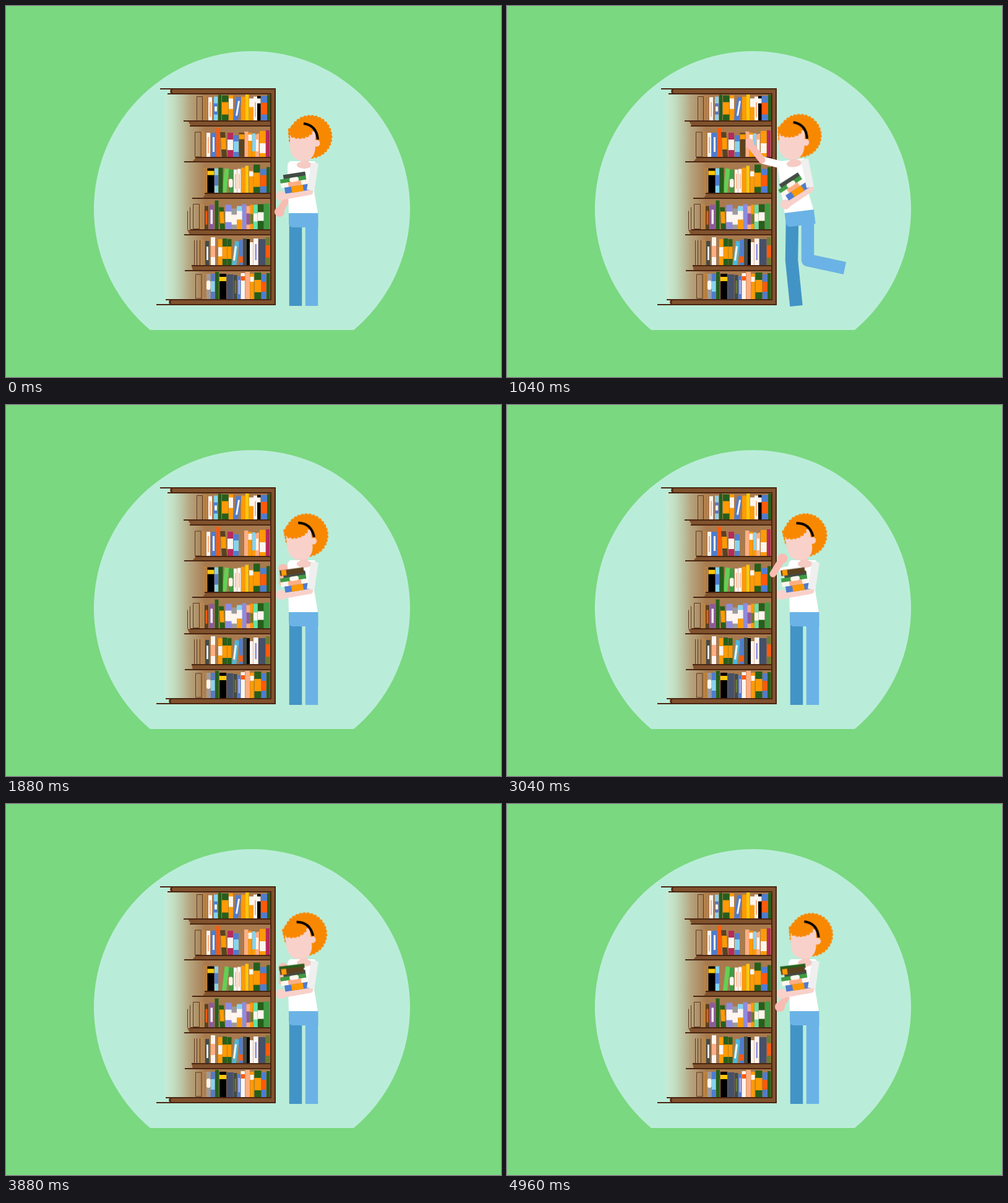
An HTML page without scripts that plays this animation: 800x600 px, repeating every 5 s.

```html
<!DOCTYPE html>
<html lang="en">
<head>
<meta charset="utf-8">
<title>Choosing books</title>
<style>
html, body { margin: 0; width: 100%; height: 100%; overflow: hidden; background: #7ad880; }
svg { display: block; width: 100%; height: 100%; }

/* book colours */
.g { fill: #265f1b; } .o { fill: #ff9a05; } .w { fill: #fdf5ee; } .b { fill: #4f7ccf; }
.s { fill: #87d3ee; } .r { fill: #ff5a0a; } .y { fill: #fdc60d; } .k { fill: #000; }
.p { fill: #ffae83; } .c { fill: #b62a5b; } .n { fill: #5a4220; } .l { fill: #63cf55; }
.e { fill: #3f9a43; } .v { fill: #8d8be0; } .u { fill: #8d5a98; } .t { fill: #465069; }
.d { fill: #434b45; } .m { fill: #68e0a5; } .a { fill: #9d9a9c; } .z { fill: #6b7a34; }
.ghost { fill: none; stroke: #5d3a20; }
.amber { fill: none; stroke: #d08a35; }

.board { fill: #80522d; }
.edge { fill: none; stroke: #4a2512; stroke-width: 2; }

.limb { fill: none; stroke-linejoin: round; }
.leg { stroke-width: 20.5; }
.skin { fill: #f8d1ca; }
.curl { fill: #f88800; stroke: #f88800; stroke-width: 6; stroke-linecap: round; stroke-dasharray: 0 6; }

.move { animation: 5s ease-in-out infinite; }
#torso { transform-origin: 481px 335px; animation-name: torso; }
#head { transform-origin: 482px 256px; animation-name: head; }
#hold { transform-origin: 492px 300px; animation-name: hold; }
#sleeve { animation-name: sleeve; }
#backLeg { animation-name: backLeg; }
#frontLeg { animation-name: frontLeg; }
#upper { animation-name: upper; }
#fore { animation-name: fore; }
#brown { animation-name: brown; }
#green { animation-name: green; }

@keyframes torso {
  0%, 33.6%, 100% { transform: none; }
  10.4% { transform: translate(0, 10px) rotate(-8.5deg); }
  18% { transform: translate(-9px, -3px) rotate(-7.5deg); }
  20.8% { transform: translate(-8.5px, -3px) rotate(-7deg); }
}
@keyframes head {
  0%, 100% { transform: none; }
  10.4% { transform: translate(-13px, 11px) rotate(-15deg); }
  18% { transform: translate(-21px, -2px) rotate(1deg); }
  20.8% { transform: translate(-20px, -2px) rotate(1.5deg); }
  33.6% { transform: rotate(-1deg); }
  37.6% { transform: translate(-1.3px, 0) rotate(-6.5deg); }
  45%, 60.4% { transform: translate(-2px, 0) rotate(-10deg); }
  67.6% { transform: translate(-1.2px, 0) rotate(-6deg); }
  77.6%, 90.4% { transform: translate(-1.6px, 0) rotate(-8.5deg); }
  99.2% { transform: rotate(-.5deg); }
}
@keyframes hold {
  0%, 33.6%, 100% { transform: none; }
  10.4% { transform: translate(-18px, 7px) rotate(2.5deg); }
  18% { transform: translate(-2px, -5px) rotate(-24deg); }
  20.8% { transform: translate(-1px, -5px) rotate(-24deg); }
}
@keyframes sleeve {
  0%, 33.6%, 100% { d: path("M499 254L492 298"); }
  10.4% { d: path("M486 261L475 305"); }
  18%, 20.8% { d: path("M481 248L490 293"); }
}
@keyframes backLeg {
  0%, 33.6%, 100% { d: path("M468 345L468 420L468 485"); }
  10.4% { d: path("M469 358L457 423L467 485.5"); }
  18%, 20.8% { d: path("M461 345L460 411L467.5 485"); }
}
@keyframes frontLeg {
  0%, 33.6%, 100% { d: path("M494 345L494 420L494 485"); }
  10.4% { d: path("M492 352L480 422L494 485"); animation-timing-function: ease-in; }
  14% { d: path("M489 346L483 417L528 462"); animation-timing-function: ease-out; }
  18.6% { d: path("M486 340L486 411L548 421"); }
  20.8% { d: path("M486 340L486 411L546 424"); animation-timing-function: ease-in; }
  27% { d: path("M490 342L489 416L527 466"); animation-timing-function: ease-out; }
}
@keyframes upper {
  0%, 100% { d: path("M464 264L464 300"); }
  10.4% { d: path("M452 272L456 308"); }
  18% { d: path("M455 260L406 246"); }
  20.8% { d: path("M455 260L412 249"); }
  28.8% { d: path("M460 264L434 283"); }
  33.6%, 37.6% { d: path("M464 264L452 286"); }
  47.2%, 60.4% { d: path("M464 264L441 270"); }
  67.6% { d: path("M462 264L408 280"); }
  72% { d: path("M463 264L424 296"); }
  77.6%, 90.4% { d: path("M464 264L452 286"); }
  99.2% { d: path("M464 264L464 300"); }
}
@keyframes fore {
  0%, 100% { d: path("M460 300L442 333"); }
  10.4% { d: path("M451 308L441 349"); }
  14% { d: path("M424 276L402 262"); }
  18% { d: path("M406 246L369 218"); }
  20.8% { d: path("M412 249L391 222"); }
  23.2% { d: path("M415 252L393 228"); }
  28.8% { d: path("M434 283L419 258"); }
  33.6% { d: path("M443 288L441 263"); }
  37.6% { d: path("M446 287L448 265"); }
  47.2%, 60.4% { d: path("M430 273L446 248"); }
  67.6% { d: path("M408 280L351 282"); }
  72% { d: path("M424 296L388 314"); }
  75% { d: path("M438 300L424 292"); }
  77.6%, 90.4% { d: path("M446 287L448 265"); }
  99.2% { d: path("M460 300L441 328"); }
}
@keyframes brown {
  0%, 22.8% { transform: translate(381px, 224.5px); }
  28.8% { transform: translate(424px, 255px) rotate(-45deg); }
  33.6% { transform: translate(452px, 262px) rotate(-88deg); }
  37.6%, 100% { transform: translate(462px, 269.5px) rotate(-98deg); }
}
@keyframes green {
  0%, 67.8% { transform: translate(347px, 282px); }
  72% { transform: translate(387px, 334px) rotate(-12deg); }
  75% { transform: translate(428px, 298px) rotate(-60deg); }
  77.6%, 100% { transform: translate(462px, 264px) rotate(-97deg); }
}
</style>
</head>
<body>
<svg viewBox="0 0 800 600" preserveAspectRatio="none">
  <defs>
    <linearGradient id="fade" gradientUnits="userSpaceOnUse" x1="257" y1="0" x2="322" y2="0">
      <stop offset="0" stop-color="#d8e8cc" stop-opacity=".45"/>
      <stop offset=".2" stop-color="#c8d6b6" stop-opacity=".6"/>
      <stop offset=".6" stop-color="#b59a72" stop-opacity=".85"/>
      <stop offset="1" stop-color="#a87a4e"/>
    </linearGradient>
    <marker id="palm" markerUnits="userSpaceOnUse" markerWidth="18" markerHeight="18" refX="9" refY="9">
      <circle cx="9" cy="9" r="8" fill="#f8bcb2"/>
    </marker>
  </defs>

  <rect width="800" height="600" fill="#7ad880"/>
  <path fill="#baedd9" d="M233 524A255.5 255.5 0 1 1 562 524z"/>

  <!-- bookcase -->
  <path fill="url(#fade)" d="M257 142H428V475H257z"/>

  <g transform="translate(0 185.5)">
    <path class="ghost" d="M308.5 0v-39h9v39z"/><path class="amber" d="M320 0v-39h4v39z"/>
    <path class="w" d="M327 0v-38h6v38M360 0v-40h7v40M393 0v-36h7v36M400 0v-39h6v39"/>
    <path class="p" d="M329-6v-24h2v24M402-6v-24h2v24"/>
    <path class="s" d="M336 0v-39h6v39"/><path class="b" d="M336-10v-18h6v18M412 0v-40h10v40M367 0l5-38h8l-5 38"/>
    <path class="w" d="M337-15v-8h4v8M371-8l4-24h3l-4 24"/>
    <path class="g" d="M343 0v-42h5v42M349 0v-41h10.500v41M422 0v-42h5v42"/>
    <path class="o" d="M349-10v-20h10.500v20M360 0v-19h7v19M360-36v-5h7v5M380 0v-39h7v39M393 0v-22h7v22"/>
    <path class="y" d="M387 0v-43h5.500v43"/>
    <path class="k" d="M406 0v-40h5.500v40"/><path class="w" d="M406-28v-8h5.500v8"/>
    <path class="r" d="M412-10v-19h10v19"/>
  </g>

  <g transform="translate(0 244)">
    <path class="ghost" d="M305.500 0v-40h9.500v40z"/><path class="amber" d="M318 0v-39h3v39z"/>
    <path class="w" d="M324 0v-39h6v39"/><path class="p" d="M326-6v-26h2v26"/>
    <path class="b" d="M331 0v-39h8.500v39M368 0v-35h8v35"/><path class="w" d="M334-8v-24h3v24"/>
    <path class="r" d="M340 0v-47h6v47"/>
    <path class="n" d="M349 0l-3-40h8l3 40"/><path class="o" d="M348-12l-1-19h8l1 19"/>
    <path class="c" d="M358 0v-39h9v39M420 0v-43h6v43"/><path class="w" d="M358-11v-17h9v17"/>
    <path class="s" d="M368-8v-17h8v17M398 0v-38h5v38"/>
    <path class="p" d="M385 0v-41h6.500v41M403 0v-36l6-2v38"/>
    <path class="o" d="M391.500 0v-39h6v39M398 0v-9h5v9M410 0v-42h9.500v42"/>
    <path class="w" d="M391.500-26v-10h6v10M404-9v-19h4v19M410-6v-16h9.500v16"/>
  </g>

  <g transform="translate(0 302.5)">
    <path class="amber" d="M320-1v-39h4v39z"/>
    <path class="k" d="M325.500 0v-40h11v40"/><path class="y" d="M325.500-29v-7h11v7"/>
    <path class="s" d="M337 0v-40h6v40"/><path class="b" d="M337-12v-17h6v17M411 0v-39h10v39"/>
    <path class="l" d="M349 0l4.500-40 7 1-4.500 39"/><path class="e" d="M360 0v-38h7v38"/>
    <rect class="w" x="360" y="-23" width="6.500" height="14" rx="3"/>
    <path class="w" d="M368 0v-38h5.500v38M374 0v-39h5.500v39"/>
    <path class="p" d="M370-7v-24h1.500v24M376-7v-24h1.500v24"/>
    <path class="o" d="M380 0v-41h6v41M393 0v-36h6.500v36"/><path class="y" d="M386.500 0v-44h5.500v44"/>
    <path class="w" d="M393-27v-8h6.500v8"/>
    <path class="g" d="M400 0v-46h10.500v46M421 0v-42h5.500v42"/>
    <path class="o" d="M400-10v-23h10.500v23"/><path class="r" d="M411-11v-18h10v18"/>
  </g>

  <g transform="translate(0 361.5)">
    <path class="ghost" d="M302.500-1v-40h10v40zM293.500-30v30M297.500-36v36"/><path class="amber" d="M315-1v-39h4v39z"/>
    <path class="n" d="M321 0v-38h6v38"/><path class="r" d="M322.500-8v-22h3v22"/>
    <path class="u" d="M328 0v-40h8.500v40"/><path class="w" d="M330.500-9v-23h3.500v23"/>
    <path class="g" d="M337.500 0v-47h6v47M346 0l-2-36h8l2 36M407 0v-41h9.500v41"/>
    <path class="o" d="M346-10l-1-19h7l1 19"/>
    <path class="v" d="M354.500 0v-40h10v40M381.500 0v-41h7v41"/>
    <path class="a" d="M364.500 0v-34h8.500v34"/><path class="w" d="M354.500-12v-17h10v17M364.500-8v-16h8.500v16"/>
    <path class="s" d="M373 0v-38h8.500v38"/><path class="w" d="M373-16v-14h8.500v14"/>
    <path class="o" d="M373 0v-16h8.500v16M394.500 0v-40h5v40"/>
    <path class="p" d="M388.500 0v-38h6v38"/><path class="u" d="M388.500-8v-18h6v18"/><path class="z" d="M394.500-9v-16h5v16"/>
    <path class="m" d="M400 0v-40h6.500v40"/><path class="w" d="M400-13v-13h6.500v13M407-14v-14h9.500v14"/>
    <path class="e" d="M417 0v-42h8.500v42"/>
  </g>

  <g transform="translate(0 420)">
    <path class="ghost" d="M304.500-1v-40M308.500-1v-40M313.500-1v-40"/><path class="amber" d="M315-1v-40h4v40z"/>
    <path class="d" d="M322 0v-40h6.500v40M383 0v-44h6v44"/><path class="w" d="M324-9v-22h3v22M331 0v-46h7v46"/>
    <path class="p" d="M331-14v-18h7v18"/>
    <path class="o" d="M343 0v-43h6.500v43"/><path class="w" d="M343-15v-15h6.500v15"/>
    <path class="g" d="M350 0v-44h7v44M357.500 0v-43h7v43"/><path class="o" d="M350-11v-20h7v20M357.500-11v-20h7v20"/>
    <path fill="#4db8da" d="M365 0l5-40 7 1-5 39"/><path class="w" d="M367-9l3-23 3 1-3 23"/>
    <path class="b" d="M376.500 0v-42h6v42"/><path class="r" d="M376.500-5v-10h6v10"/>
    <path class="k" d="M389 0v-43h5v43"/><path class="w" d="M394 0v-38h5.500v38M400 0v-44h7.500v44"/>
    <path class="v" d="M402.500-9v-26h2.500v26"/><path class="t" d="M408 0v-43h11.500v43"/>
    <path class="z" d="M420 0v-46h6.500v46"/><path class="r" d="M420-13v-20h6.500v20"/>
  </g>

  <g transform="translate(0 474)">
    <path class="ghost" d="M306.500-1v-39h9.500v39z"/><path class="amber" d="M319-1v-39h4v39z"/>
    <path class="a" d="M324 0v-41h6.500v41"/><rect class="w" x="324" y="-30" width="6.500" height="15" rx="3"/>
    <path class="b" d="M331 0v-41h6.500v41M374 0v-37h5.500v37M413 0v-40h7.500v40"/><path class="s" d="M331-12v-17h6.500v17"/>
    <path class="g" d="M338 0v-44h6v44M401.500 0v-43h11v43M421 0v-42h5.500v42"/>
    <path class="k" d="M345 0v-41h11v41"/><path class="y" d="M345-29v-7h11v7"/>
    <path class="t" d="M356.500 0v-40h11v40"/><path class="d" d="M368 0v-39h5.500v39"/><path class="z" d="M369.500-9v-21h2.500v21"/>
    <path fill="#b8b1ea" d="M375.500-8v-23h2.500v23"/>
    <path class="w" d="M379.500 0v-42h6.500v42"/><path class="r" d="M379.500-30v-7h6.500v7"/>
    <path class="p" d="M386.500 0v-44h7.500v44"/><path class="o" d="M394.500 0v-41h6v41M401.500-11v-20h11v20"/>
    <path class="w" d="M394.500-28v-8h6v8"/><path class="r" d="M413-12v-16h7.500v16"/>
  </g>

  <path class="board" d="M265 138q0-4 4-4H435V483H267q-4 0-4-4t4-4H428V428H302l-2-8H428V370H297l-4-8H428V311H318l5-8H428V252H301l6-7H428V194H299l-5-8H428V142H269q-4 0-4-4z"/>
  <path class="edge" d="M249 134H435V483H243M261 142H428V475H258M287 186H428M297 194H428M306 245H428M288 252H428M321 303H428M301 311H428M298 362H428M288 370H428M300 420H428M289 428H428M269 134q-4 4 0 8M267 475q-4 4 0 8"/>

  <!-- far arm -->
  <path id="upper" class="move limb" stroke="#fff" stroke-width="12" d="M464 264L464 300"/>
  <path id="fore" class="move limb" stroke="#f8bcb2" stroke-width="11" stroke-linecap="round" marker-end="url(#palm)" d="M460 300L442 333"/>

  <path id="backLeg" class="move limb leg" stroke="#4394c6" d="M468 345L468 420L468 485"/>
  <path id="frontLeg" class="move limb leg" stroke="#6bb3e6" d="M494 345L494 420L494 485"/>

  <g id="torso" class="move">
    <path fill="#6bb3e6" d="M457 334H504.500V358H463q-6-1-6-8z"/>
    <path fill="#fff" d="M460 251H498Q504 254 502 272L498 300 504 335H457L455 258Q456 252 460 251z"/>
    <ellipse cx="482" cy="257" rx="12" ry="6" fill="#f5cbc3"/>
  </g>

  <g id="head" class="move">
    <path fill="#f5cbc3" d="M477 242h12v16h-12z"/>
    <circle class="curl" cx="492" cy="211.500" r="32.500"/>
    <path class="skin" d="M459 203V227Q460 250 480 250T500 226V203z"/>
    <circle class="skin" cx="502" cy="222" r="5.500"/>
    <ellipse class="curl" cx="476" cy="202" rx="18" ry="10" transform="rotate(-6 476 202)"/>
    <path fill="none" stroke="#000" stroke-width="4" d="M481 190Q502 193 504 216"/>
  </g>

  <!-- near arm with the pile -->
  <g id="hold" class="move">
    <path class="limb" stroke="#f8d1ca" stroke-width="11" stroke-linecap="round" d="M491 300L446 308"/>
    <circle class="skin" cx="444" cy="307" r="8"/>
    <g transform="rotate(-9 470 286)">
      <path class="d" d="M450 270h36v7h-36z"/>
      <path class="e" d="M444 276.500h42v7h-42z"/>
      <path class="w" d="M444 283h43v7.500h-43z"/>
      <path class="p" d="M456 283h21v7.500h-21z"/>
      <path class="b" d="M449 290.500h41v10h-41z"/>
      <path class="o" d="M460 290.500h19v10h-19z"/>
      <rect class="w" x="459" y="276.500" width="15" height="7" rx="3.500"/>
    </g>
  </g>
  <path id="sleeve" class="move limb" stroke="#efefef" stroke-width="12" d="M499 254L492 298"/>

  <g id="green" class="move"><path class="g" d="M-3.500-20.500h7v41h-7z"/></g>
  <g id="brown" class="move">
    <path class="n" d="M-4.500-19.500h9v39h-9z"/>
    <path class="o" d="M-4.500-17h9v8h-9z"/>
  </g>
</svg>
</body>
</html>
```
